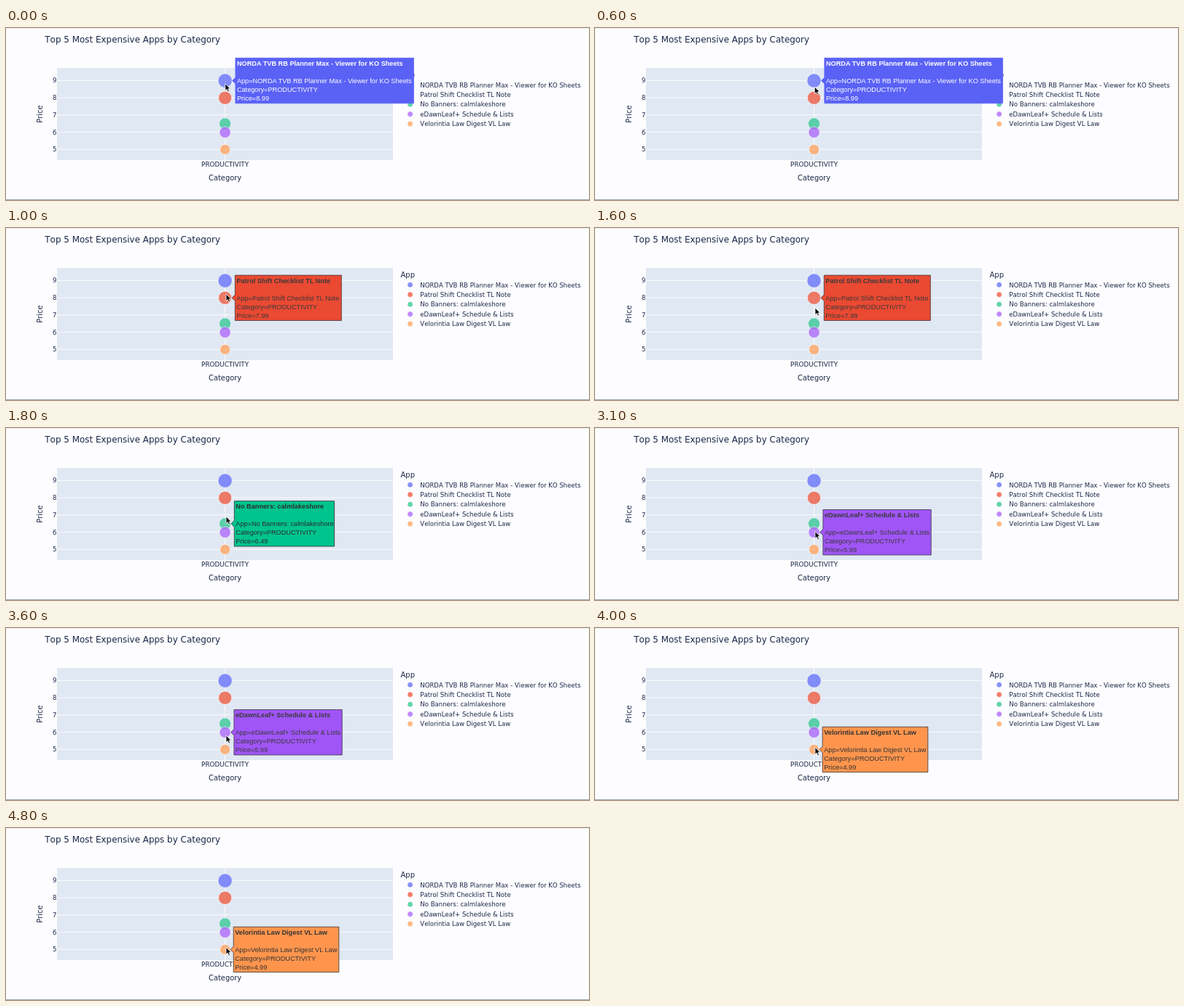
These frames come from a looping animation (800 px wide and 237 px high, 4.9 s). An HTML page:

```html
<!DOCTYPE html>
<html lang="en">
<head>
<meta charset="utf-8">
<title>Top 5 Most Expensive Apps by Category</title>
<style>
  html, body { margin: 0; width: 100%; height: 100%; overflow: hidden; background: #fdfcfe; }
  svg { display: block; width: 800px; height: 237px; }
  text { font-family: "DejaVu Sans", Verdana, sans-serif; font-kerning: none; fill: #1b2848; white-space: pre; }
  .tip text { font: 9.18px "Liberation Sans", Arial, sans-serif; }
  .tip .head { font-weight: bold; }
</style>
</head>
<body>
<svg id="stage" viewBox="0 0 800 237"></svg>
<script>
const LOOP = 4900, STEP = 100;
const CX = 300.6, TOP_Y = 72.3, UNIT = 23.73;

// name, price, marker radius, marker colour, label colour, label ink, label width, label start
const APPS = [
  ["NORDA TVB RB Planner Max - Viewer for KO Sheets", 8.99, 10, "#636efa", "#5a62f6", "#fff", 244.6, 0],
  ["Patrol Shift Checklist TL Note", 7.99, 9.4, "#ef553b", "#ea4932", "#3a3a3a", 146, 800],
  ["No Banners: calmlakeshore", 6.49, 8.4, "#31c792", "#00c48d", "#2c2c2c", 137.3, 1700],
  ["eDawnLeaf+ Schedule & Lists", 5.99, 8, "#ab63fa", "#a055f7", "#3a3a3a", 148.3, 2800],
  ["Velorintia Law Digest VL Law", 4.99, 7.3, "#ffa15a", "#ff954d", "#333", 144.6, 3800]
];

// time, x, y of the pointer: it lingers on a marker, then moves on
const PATH = [
  [0, 300.8, 76.8], [600, 301.3, 81], [800, 301.8, 86], [1000, 302, 91], [1400, 302, 99], [1600, 302, 110],
  [1800, 302, 122], [2100, 302, 130], [2600, 302, 136], [3100, 302, 142.6], [3600, 302, 148],
  [3800, 302, 157], [4000, 302, 164.5], [LOOP, 302, 164.5]
];

const stage = document.getElementById("stage");
const yOf = price => TOP_Y + (9 - price) * UNIT;

function add(tag, attrs, parent = stage) {
  const el = document.createElementNS("http://www.w3.org/2000/svg", tag);
  for (const key in attrs) el.setAttribute(key, attrs[key]);
  parent.appendChild(el);
  return el;
}

function label(str, x, y, size, attrs = {}, parent = stage) {
  const el = add("text", { x, y, "font-size": size, ...attrs }, parent);
  el.textContent = str;
  return el;
}

function dot(cx, cy, r, fill) {
  add("circle", { cx, cy, r, fill, stroke: "#fff", "stroke-width": .7, opacity: .76 });
}

function makeTip([name, price, r, , fill, ink, width]) {
  const y = yOf(price), tip = CX + r, left = tip + 4.3, right = left + width;
  const g = add("g", { class: "tip" });
  add("path", {
    d: `M${tip} ${y}L${left} ${y - 4.3}V${y - 31.2}H${right}V${y + 31.2}H${left}V${y + 4.3}Z`,
    fill, stroke: ink === "#fff" ? fill : ink, "stroke-width": .8
  }, g);
  const rows = [[name, -20.4], ["App=" + name, 3.5], ["Category=PRODUCTIVITY", 15.4], ["Price=" + price, 27.3]];
  rows.forEach(([str, dy], i) =>
    label(str, left + 2, y + dy, 9.18, { style: `fill:${ink}`, class: i ? "" : "head" }, g));
  return g;
}

// page edges and plot area
add("rect", { width: 800, height: 1, fill: "#ececf0" });
add("rect", { y: 236, width: 800, height: 1, fill: "#9aa6b2" });
add("rect", { x: 70, y: 55, width: 461, height: 127, fill: "#e0e8f3" });
const grid = { stroke: "#fff", "stroke-width": .9 };
add("path", { d: `M${CX} 55V182`, ...grid });
for (let p = 5; p <= 9; p++) {
  add("path", { d: `M70 ${yOf(p)}H531`, ...grid });
  label(p, 69.4, yOf(p) + 3.1, 8.6, { "text-anchor": "end" });
}

// titles
label("Top 5 Most Expensive Apps by Category", 53.3, 19.8, 11.95);
label("PRODUCTIVITY", CX, 191.2, 8.8, { "text-anchor": "middle" });
label("Category", CX, 210.2, 9.85, { "text-anchor": "middle" });
label("Price", 0, 0, 9.85, { "text-anchor": "middle", transform: "translate(50.3 118.6) rotate(-90)" });
label("App", 541.5, 67.6, 10);

// markers and legend
APPS.forEach(([name, price, r, color], i) => {
  const y = 78.3 + i * 13.45;
  dot(CX, yOf(price), r - .3, color);
  dot(554.6, y, 3.8, color);
  label(name, 568.3, y + 3.2, 8.56);
});

const tips = APPS.map(makeTip);
const pointer = add("path", {
  d: "M0 0V9.6L2.2 7.6L3.8 11L5.5 10.3L4 6.9H7Z",
  fill: "#000", stroke: "#fff", "stroke-width": .8, "stroke-linejoin": "round"
});

function place(t) {
  const i = PATH.findIndex(key => key[0] > t);
  const [t0, x0, y0] = PATH[i - 1], [t1, x1, y1] = PATH[i];
  const k = (t - t0) / (t1 - t0);
  return [x0 + (x1 - x0) * k, y0 + (y1 - y0) * k];
}

function draw(now) {
  const t = Math.floor(now % LOOP / STEP) * STEP;
  const active = APPS.filter(app => app[7] <= t).length - 1;
  tips.forEach((tip, i) => tip.setAttribute("visibility", i === active ? "visible" : "hidden"));
  pointer.setAttribute("transform", `translate(${place(t)})`);
}

const start = performance.now();
function tick() {
  draw(performance.now() - start);
  requestAnimationFrame(tick);
}
tick();
</script>
</body>
</html>
```
